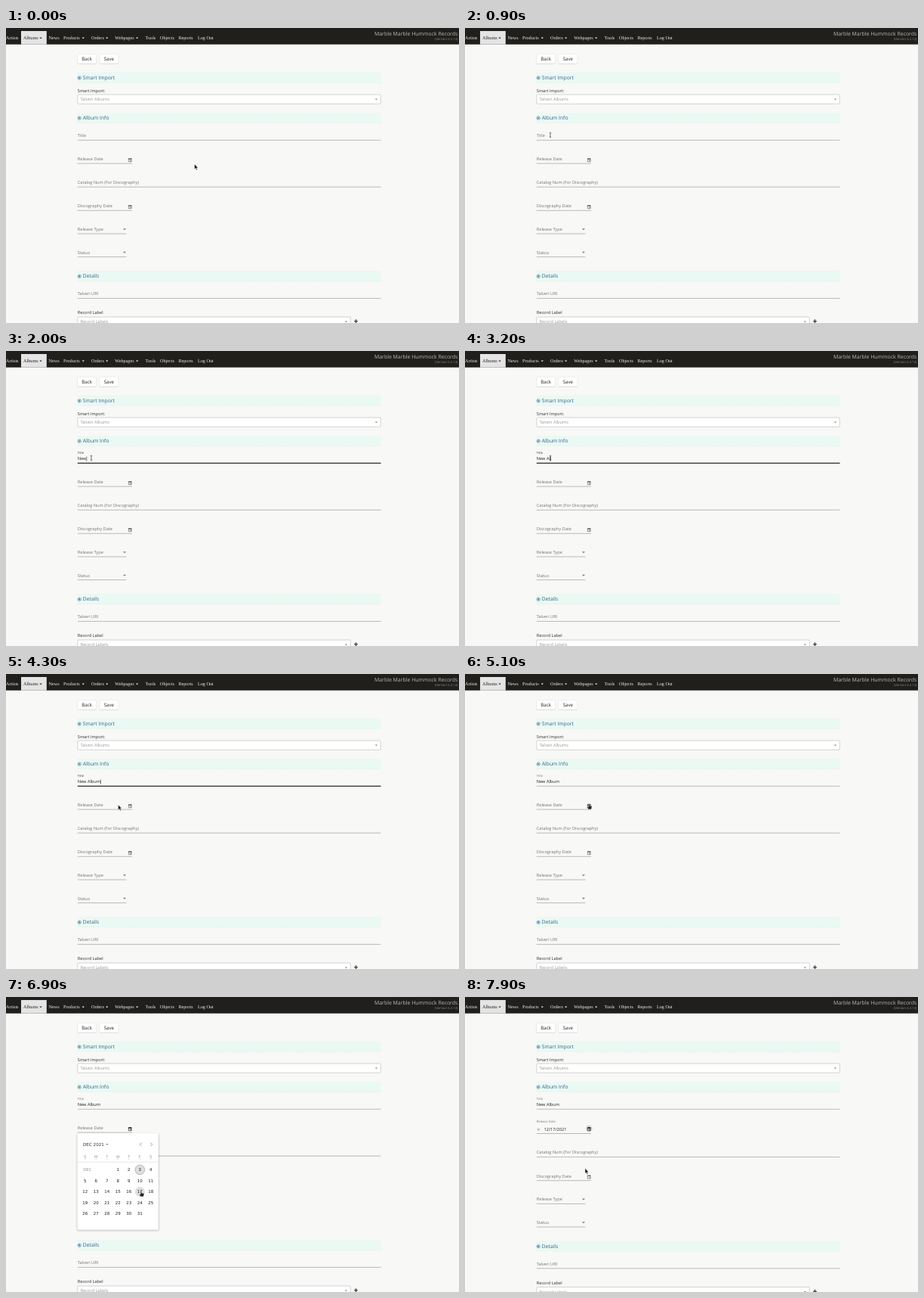
An HTML page for the animation above (8000 ms loop, 600 px wide and 390 px high).

```html
<!DOCTYPE html>
<html lang="en">
<head>
<meta charset="utf-8">
<title>Album form</title>
<style>
  html, body { margin: 0; width: 100%; height: 100%; overflow: hidden; background: #f8f8f6; }
  svg { display: block; width: 600px; height: 390px; }
  text { font-family: "Open Sans", "Noto Sans", sans-serif; text-rendering: geometricPrecision; }
  .nav { font-family: "Liberation Serif", serif; }
  .cal { font-family: "DejaVu Sans", sans-serif; }
</style>
</head>
<body>
<svg id="stage" viewBox="0 0 600 390" xmlns="http://www.w3.org/2000/svg"></svg>
<script>
const LOOP = 8000, STEP = 100, SHIFT = 1.4;
const GREY = '#757575', DARK = '#303030', BLUE = '#35628e', SIZE = 5.62;
const stage = document.getElementById('stage');

// Markup helpers
const text = (x, y, s, { size = SIZE, fill = GREY, anchor = 'start', cls = '', id = '', weight = 400 } = {}) =>
  `<text x="${x}" y="${y}" font-size="${size}" fill="${fill}" text-anchor="${anchor}" class="${cls}" id="${id}" font-weight="${weight}">${s}</text>`;
const rect = (x, y, w, h, fill, extra = '') =>
  `<rect x="${x}" y="${y}" width="${w}" height="${h}" fill="${fill}" ${extra}/>`;
const line = (x1, x2, y, extra = '') =>
  `<path d="M${x1} ${y}H${x2}" stroke="#8f8f8f" stroke-width=".6" ${extra}/>`;
const caret = (x, y, fill, r = 2) =>
  `<path d="M${x - r} ${y - r / 2}h${2 * r}l${-r} ${r}z" fill="${fill}"/>`;

function section(y, title) {
  return rect(94.5, y, 402, 13.5, '#eaf9f3') +
    `<path d="M94.5 ${y + 13.3}H496.5" stroke="#d3ebe2" stroke-width=".5" stroke-dasharray="1 .7"/>` +
    `<circle cx="97.2" cy="${y + 7.2}" r="2.1" fill="none" stroke="${BLUE}" stroke-width=".6"/>` +
    `<circle cx="97.2" cy="${y + 7.2}" r=".95" fill="${BLUE}"/>` +
    text(101.8, y + 9.3, title, { size: 6.75, fill: BLUE });
}

function combo(y, w, hint) {
  return rect(94.8, y, w, 12.3, '#fff', 'rx="1.4" stroke="#b8b8b8" stroke-width=".6"') +
    text(98.4, y + 8.2, hint, { size: 5.7, fill: '#9a9a9a' }) +
    caret(94.8 + w - 5.8, y + 6.4, '#888', 1.7);
}

function button(x, label) {
  return rect(x, 34.9, 25, 12.8, '#000', 'rx="1.5" opacity=".13"') +
    rect(x, 34.4, 25, 12.7, '#fff', 'rx="1.5" stroke="#dedede" stroke-width=".4"') +
    text(x + 12.5, 43.1, label, { size: 6.2, fill: '#222', anchor: 'middle' });
}

const dateIcon = (y, id = '') =>
  `<g id="${id}" transform="translate(164.3 ${y})" fill="#5c5c5c" stroke="#5c5c5c">
    <path d="M-1.9 -1.9h3.8v4h-3.8z" fill="none" stroke-width=".6"/>
    <path d="M-2 -2h4v1.1h-4zM-1.5 -2.7h.5v.8h-.5zM1 -2.7h.5v.8h-.5zM.1 .2h1.2v1.2h-1.2z" stroke="none"/>
  </g>`;

const dropdown = (y, label) =>
  text(94.8, y, label) + caret(157, y - 1.9, '#757575', 2) + line(94.8, 159.5, y + 3.9);

function navbar() {
  const items = [['Artists', 0], ['Albums', 23, 46], ['News', 56.5], ['Products', 76, 102.3], ['Orders', 113, 133.7],
    ['Webpages', 144.3, 173.7], ['Tools', 184.6], ['Objects', 204], ['Reports', 228.4], ['Log Out', 254]];
  return rect(0, 0, 600, 21.7, '#201f1c') + rect(20, 4, 33.8, 17.7, '#e4e4e4') +
    items.map(([s, x, mark]) => {
      const fill = s === 'Albums' ? '#222' : '#f0f0ee';
      return text(x, 15, s, { size: 6.2, fill, cls: 'nav' }) + (mark ? caret(mark, 13.3, fill, 1.7) : '');
    }).join('') +
    text(598.4, 10.4, 'Marble Marble Hummock Records', { size: 6.95, fill: '#b9b8b5', anchor: 'end' }) +
    text(598.4, 15.8, '(Version 6.2.12)', { size: 4.25, fill: '#8b8a87', anchor: 'end' });
}

function calendar() {
  const col = i => 104.8 + 14.5 * i, row = i => 228.4 + 14.52 * i;
  let s = rect(93.8, 181.2, 109, 128, '#000', 'rx="2" opacity=".18" filter="url(#soft)"') +
    rect(94.5, 180, 107.4, 127.8, '#fff', 'rx="1.5" stroke="#ddd" stroke-width=".3"') +
    text(102, 196.9, 'DEC 2021', { fill: DARK, cls: 'cal' }) + caret(134, 195, '#666', 1.7) +
    `<path d="M179.4 192.6l-2.1 2.2 2.1 2.2M191.6 192.6l2.1 2.2-2.1 2.2" fill="none" stroke="#777" stroke-width=".7"/>` +
    line(94.5, 201.9, 218.2, 'opacity=".35"');
  [...'SMTWTFS'].forEach((d, i) => {
    s += text(col(i), 213.3, d, { size: 5.1, fill: '#999', anchor: 'middle', cls: 'cal' }) +
      `<path d="M${col(i) - 1.8} 214.5h3.6" stroke="#aaa" stroke-width=".4" stroke-dasharray=".5 .4"/>`;
  });
  s += text(107.6, 230.3, 'DEC', { size: 5.2, fill: '#8a8a8a', anchor: 'middle', cls: 'cal' }) +
    `<circle cx="${col(5)}" cy="${row(0)}" r="6.4" fill="#dedede" stroke="#9a9a9a" stroke-width=".6"/>` +
    `<circle id="hover" cx="${col(5)}" cy="${row(2)}" r="6.4" fill="#dfdfdf"/>`;
  for (let d = 1; d <= 31; d++) {
    const n = d + 2;
    s += text(col(n % 7), row(Math.floor(n / 7)) + 2, d, { size: 5.5, fill: '#222', anchor: 'middle', cls: 'cal' });
  }
  return `<g id="calendar">${s}</g>`;
}

const cursors =
  `<g id="arrow"><path d="M0 0V6.7L1.6 5.3 2.7 7.8 3.8 7.3 2.8 4.9H4.8z" fill="#111" stroke="#fff" stroke-width=".45"/></g>
   <g id="beam" fill="none"><path d="M-1.2 -3.1Q0 -3.1 0 -2.3Q0 -3.1 1.2 -3.1M0 -2.3V2.3M-1.2 3.1Q0 3.1 0 2.3Q0 3.1 1.2 3.1" stroke="#222" stroke-width=".65"/></g>
   <g id="hand"><path d="M-.7 .4Q0 -.5 .7 .4V3L3.5 3.6Q4.2 3.8 4 4.8L3.3 7.9H-.4L-2.6 4.9Q-2.4 3.9 -.7 5z" fill="#222" stroke="#fff" stroke-width=".45"/></g>`;

stage.innerHTML =
  `<defs><filter id="soft"><feGaussianBlur stdDeviation="1.3"/></filter></defs>` +
  rect(0, 0, 600, 390, '#f8f8f6') + navbar() +
  button(94.7, 'Back') + button(123.9, 'Save') +
  section(58.7, 'Smart Import') +
  text(94.8, 85.2, 'Smart Import:', { fill: DARK }) + combo(88, 401.5, 'Talveri Albums') +
  section(111.9, 'Album Info') +
  text(94.8, 144.2, 'Title', { id: 'titleLabel' }) + text(94.8, 144.3, '', { fill: '#222', id: 'titleValue' }) +
  rect(0, 139.4, 0.5, 6.2, '#111', 'id="bar"') +
  line(94.8, 496.5, 148.3) + rect(94.8, 147.7, 401.7, 1.1, '#1c1c1c', 'id="focusLine"') +
  text(94.8, 175, 'Release Date', { id: 'dateLabel' }) +
  `<g id="dateValue"><path d="M95.9 173.7l3 3m0 -3l-3 3" stroke="#444" stroke-width=".5"/>` +
  text(104.4, 177.1, '12/17/2021', { size: 5.7, fill: '#222' }) +
  `<circle cx="164.3" cy="174" r="4.4" fill="#d6d6d4"/></g>` +
  dateIcon(174.6, 'icon') +
  `<g id="below">` + line(94.8, 167, 179.1) +
  text(94.8, 206, 'Catalog Num (For Discography)') + line(94.8, 496.5, 210.2) +
  text(94.8, 237.3, 'Discography Date') + dateIcon(236.6) + line(94.8, 167, 241.3) +
  dropdown(268.1, 'Release Type') + dropdown(298.7, 'Status') +
  section(321.1, 'Details') +
  text(94.8, 353.2, 'Talveri URI') + line(94.8, 496.5, 357.4) +
  text(94.8, 378.2, 'Record Label', { fill: DARK }) + combo(382, 361.5, 'Record Labels') +
  `<path d="M461 387.8h5M463.5 385.3v5" stroke="#222" stroke-width="1.1"/></g>` +
  calendar() + cursors;

const el = {};
stage.querySelectorAll('[id]').forEach(n => { if (n.id) el[n.id] = n; });

const clamp = v => Math.max(0, Math.min(1, v));
const ease = v => v * v * (3 - 2 * v);
const phase = (t, a, b) => ease(clamp((t - a) / (b - a)));
const mix = (a, b, p) => a + (b - a) * p;
const show = (n, o) => n.setAttribute('opacity', +o);

// Pointer stops: time, x, y
const stops = [[100, 249.6, 180], [900, 113, 141.4], [3900, 113, 141.4], [4500, 161, 184], [4800, 164, 171],
  [5500, 164, 171], [6000, 194, 191.5], [6100, 194, 191.5], [6550, 172, 228], [6900, 178.8, 256],
  [7300, 178.8, 256], [7900, 159, 226.6]];

function pointer(t) {
  const i = stops.findIndex(s => s[0] > t);
  if (i === 0) return stops[0].slice(1);
  if (i < 0) return stops[stops.length - 1].slice(1);
  const [a, b] = [stops[i - 1], stops[i]], p = phase(t, a[0], b[0]);
  return [mix(a[1], b[1], p), mix(a[2], b[2], p)];
}

const typing = [[1700, 1], [1800, 2], [1900, 3], [2200, 4], [2500, 5], [3200, 6], [3300, 7], [3400, 8], [3600, 9]];

function float(label, p, from, to) {
  label.setAttribute('y', mix(from, to, p));
  label.setAttribute('font-size', mix(SIZE, SIZE * 0.74, p));
}

function draw(t) {
  const focused = t >= 1100 && t < 5100;
  float(el.titleLabel, phase(t, 1000, 1300), 144.2, 135.5);
  el.titleLabel.setAttribute('fill', focused ? DARK : GREY);

  const count = typing.reduce((n, [at, c]) => t >= at ? c : n, 0);
  el.titleValue.textContent = 'New Album'.slice(0, count).replace(' ', '\u00a0');
  el.bar.setAttribute('x', 95 + (count ? el.titleValue.getComputedTextLength() : 0));
  show(el.bar, focused);

  const grow = phase(t, 1000, 1300) * 401.7;
  el.focusLine.setAttribute('x', 295.65 - grow / 2);
  el.focusLine.setAttribute('width', grow);
  show(el.focusLine, focused);

  const picked = t >= 7200;
  float(el.dateLabel, phase(t, 7100, 7400), 175, 166);
  show(el.dateValue, picked);
  el.below.setAttribute('transform', `translate(0 ${picked ? SHIFT : 0})`);
  const tone = t >= 5000 ? '#111' : '#5c5c5c';
  el.icon.setAttribute('fill', tone);
  el.icon.setAttribute('stroke', tone);

  const open = phase(t, 5100, 5300) * (1 - phase(t, 7100, 7300));
  const scale = t < 6000 ? mix(0.8, 1, open) : 1;
  show(el.calendar, open);
  el.calendar.setAttribute('transform', `translate(0 ${180 * (1 - scale)}) scale(1 ${scale})`);

  const [x, y] = pointer(t);
  const onDay = t < 7400 && Math.hypot(x - 177.3, y - 257.4) < 7;
  show(el.hover, onDay);
  const onIcon = t >= 4700 && t < 5600;
  const onArrows = t >= 5900 && t < 6200;
  const onDays = t >= 6400 && t < 7300;
  const kind = t < 4200 && y < 149 ? 'beam' : onIcon || onArrows || onDays ? 'hand' : 'arrow';
  for (const k of ['arrow', 'beam', 'hand']) {
    show(el[k], k === kind);
    el[k].setAttribute('transform', `translate(${x} ${y})`);
  }
}

const start = performance.now();
function tick(now) {
  const t = Math.max(0, now - start) % LOOP;
  draw(Math.floor(t / STEP) * STEP);
  requestAnimationFrame(tick);
}
draw(0);
requestAnimationFrame(tick);
</script>
</body>
</html>
```
